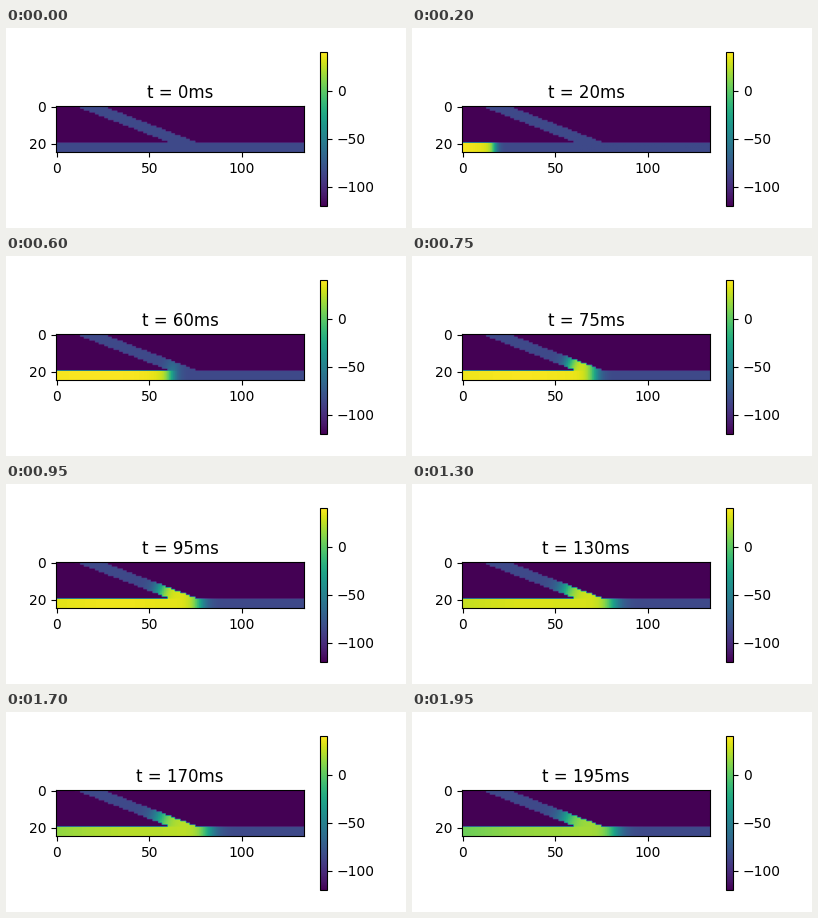
Write a matplotlib script that moves like this. It is 400x200 px and loops after 2 s.

```python
import numpy as np
import matplotlib.pyplot as plt
from matplotlib.animation import FuncAnimation

ROWS, COLS = 25, 134
STEP_MS = 5
FRAMES = 40
REST, OUTSIDE, PEAK = -85, -120, 40
SLOPE = 50 / 19

row, col = np.mgrid[:ROWS, :COLS]
strip = row >= 20
left = np.floor(10 + SLOPE * row + 0.5)
branch = ~strip & (col >= left) & (col < left + 15)
along = (SLOPE * col + row) / np.hypot(SLOPE, 1)


def sigmoid(z):
    return 1 / (1 + np.exp(-np.clip(z, -50, 50)))


def front(t):
    """Wave front column: steady run, then stalled past the junction."""
    if t < 60:
        return 62 - 1.12 * (60 - t)
    return 82 - 20 * np.exp(-(t - 60) / 25)


def plateau(t):
    """Voltage of excited tissue by time since activation."""
    age = np.clip(t - 4.6 - col / 1.12, 0, None)
    upstroke = 14 * np.exp(-age / 8)
    recovery = 38 * (age / 195) ** 2.2
    load = 6 * sigmoid((col - 45) / 7) * sigmoid((t - 75) / 8)
    return PEAK - upstroke - recovery - load


def voltage(t):
    v = np.full((ROWS, COLS), float(OUTSIDE))
    tissue = strip | branch
    if t == 0:
        v[tissue] = REST
        return v
    width = np.interp(t, [50, 60, 95, 130], [1.2, 1.9, 2.4, 2.9])
    active = sigmoid((front(t) - col) / width)
    climb = 56.5 + 8.5 * np.exp(-max(t - 60, 0) / 12)
    active = np.where(branch, active * sigmoid((along - climb) / width), active)
    v[tissue] = (REST + (plateau(t) - REST) * active)[tissue]
    return v


fig, ax = plt.subplots(figsize=(4, 2), dpi=100)
im = ax.imshow(voltage(0), vmin=OUTSIDE, vmax=PEAK, cmap="viridis")
fig.colorbar(im)
title = ax.set_title("t = 0ms")


def update(i):
    t = i * STEP_MS
    im.set_data(voltage(t))
    title.set_text(f"t = {t}ms")
    return im, title


anim = FuncAnimation(fig, update, frames=FRAMES, interval=50,
                     repeat=True, repeat_delay=0)
plt.show()
```
